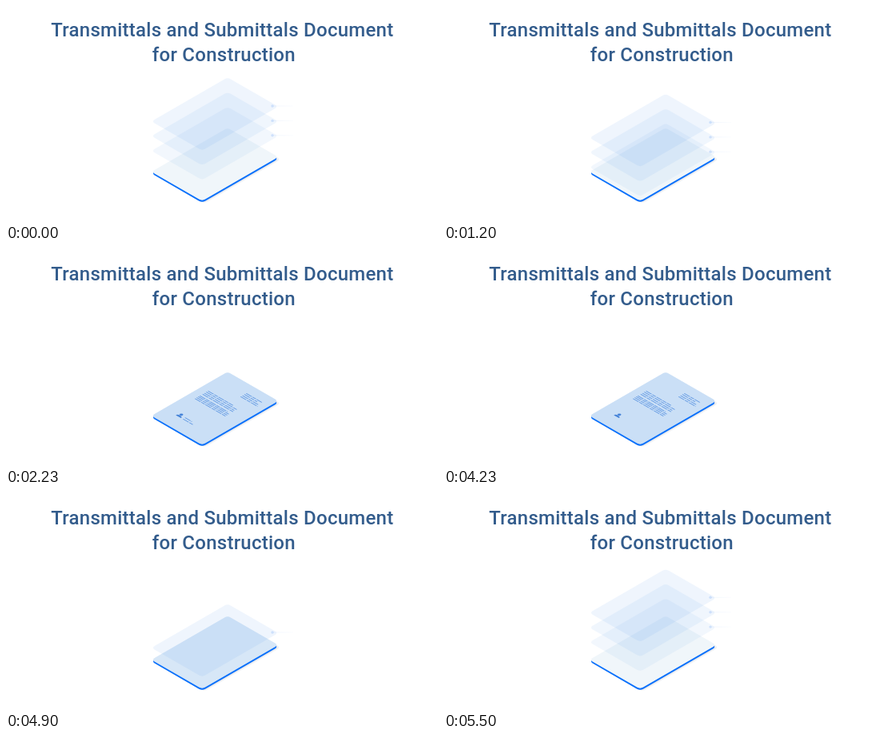
Write an HTML page with a canvas that moves like this. It is 540x270 px and loops after 5550 ms.

```html
<!DOCTYPE html>
<html lang="en">
<head>
<meta charset="utf-8">
<title>Document layers</title>
<style>
  html, body { margin: 0; width: 100%; height: 100%; overflow: hidden; background: #fff; }
  canvas { display: block; width: 540px; height: 270px; }
</style>
</head>
<body>
<canvas id="stage" width="540" height="270"></canvas>
<script>
const ctx = document.getElementById("stage").getContext("2d");
const LOOP = 5550;
const TOP = { x: 277, y: 152.2 };
const SHEET = { w: 73.2, h: 110, r: 4.5 };
const COS = Math.cos(Math.PI / 6);
const HEIGHT = 63;
const GAP = 18.4;
const INK = "#5f97e2";

// Lines of writing on the sheet: [start, end, distance from the upper edge]
const HEADER = [[40.5, 63, 13.6], [40.5, 59, 16.3], [40.5, 63, 19], [40.5, 65, 21.7]];
const FIRST = [[10, 46, 38.2], [10, 55, 40.8], [10, 53, 43.4], [10, 55, 46]];
const SECOND = [[10, 50, 50], [10, 54, 52.3], [10, 54, 54.6], [10, 54, 57]];
const CAPTION = [[26.5, 36.5, 88], [27, 41, 91.2]];

// Draws on a plane tilted into the isometric view
function onPlane(dx, dy, draw) {
  ctx.save();
  ctx.transform(COS, 0.5, -COS, 0.5, TOP.x + dx, TOP.y + dy);
  draw();
  ctx.restore();
}

function sheet(color, dx, dy) {
  onPlane(dx, dy, () => {
    ctx.fillStyle = color;
    ctx.beginPath();
    ctx.roundRect(0, 0, SHEET.w, SHEET.h, SHEET.r);
    ctx.fill();
  });
}

function writing(lines) {
  ctx.strokeStyle = INK;
  ctx.lineWidth = 0.95;
  ctx.setLineDash([8, 1, 5, 1]);
  for (const [from, to, v] of lines) {
    ctx.beginPath();
    ctx.moveTo(from, v);
    ctx.lineTo(to, v);
    ctx.stroke();
  }
}

function person() {
  ctx.fillStyle = "#4583d8";
  ctx.beginPath();
  ctx.arc(20.2, 87, 1.9, 0, 7);
  ctx.fill();
  ctx.beginPath();
  ctx.ellipse(20.5, 91.6, 3.7, 2.7, 0, Math.PI, 0);
  ctx.fill();
}

function leader(lift) {
  const y = 188 - lift;
  const fade = ctx.createLinearGradient(334, 0, 360, 0);
  fade.addColorStop(0, "rgba(90,150,240,0.09)");
  fade.addColorStop(1, "rgba(90,150,240,0.02)");
  ctx.fillStyle = fade;
  ctx.fillRect(334, y - 0.5, 25, 1);
  ctx.fillStyle = "rgba(70,140,245,0.2)";
  ctx.beginPath();
  ctx.arc(333, y, 1.7, 0, 7);
  ctx.fill();
}

function title() {
  ctx.fillStyle = "#335c8c";
  ctx.font = "500 24px Roboto, sans-serif";
  ctx.letterSpacing = "0.25px";
  ctx.textAlign = "center";
  ctx.fillText("Transmittals and Submittals Document", 270.3, 38);
  ctx.fillText("for Construction", 272.3, 69);
}

// Height of the top layer; the rise mirrors the fall
function liftAt(t) {
  const step = Math.floor(t / 50) * 50;
  const s = Math.max(0, Math.min(step, 6500 - step) - 950);
  return Math.max(0, HEIGHT - 0.0871 * s + 0.0000205 * s * s);
}

function stageAt(t) {
  const marks = t < 3000 ? [1950, 2020, 2090, 2160, 2230] : [4510, 4440, 4370, 4300, 4230];
  return marks.filter(m => t < 3000 ? t >= m : t < m).length;
}

function content(stage) {
  onPlane(0, 0, () => {
    if (stage > 0) writing(HEADER.slice(0, stage > 1 ? 4 : 2));
    if (stage > 2) writing(FIRST);
    if (stage > 3) { writing(SECOND); person(); }
    if (stage > 4) writing(CAPTION);
  });
}

function draw(t) {
  ctx.fillStyle = "#fff";
  ctx.fillRect(0, 0, 540, 270);
  title();
  sheet("rgba(40,60,90,0.06)", 3, 3);
  sheet("rgba(40,60,90,0.06)", 1.5, 2.5);
  sheet("#0a70fb", 0, 2.1);
  sheet("#f0f6fa", 0, 0);
  const lift = liftAt(t);
  [0.065, 0.075, 0.08].forEach((alpha, i) => {
    const h = Math.max(0, lift - GAP * (2 - i));
    sheet(`rgba(60,130,225,${alpha})`, 0, -h);
    if (h > 0) leader(h);
  });
  content(stageAt(t));
}

function tick() {
  draw(performance.now() % LOOP);
  requestAnimationFrame(tick);
}
tick();
</script>
</body>
</html>
```
